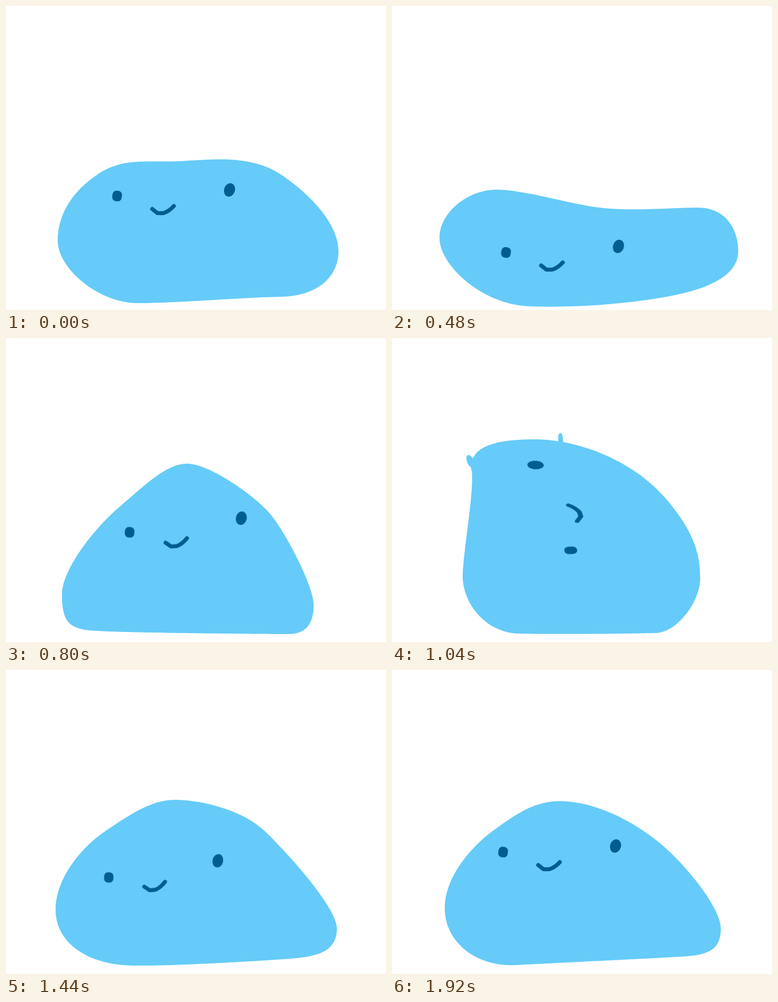
These frames come from a looping animation (720x576 px, 2240 ms). An HTML page without scripts:

```html
<!DOCTYPE html>
<html lang="en">
<head>
<meta charset="utf-8">
<title>Jelly blob</title>
<style>
  html, body { margin: 0; width: 100%; height: 100%; overflow: hidden; background: #fff; }
  svg { display: block; width: 100%; height: 100%; }
  .skin { fill: #66cbf8; }
  .face { fill: #005d90; }
  .mouth { fill: none; stroke: #005d90; stroke-width: 7.5; stroke-linecap: round; stroke-linejoin: round; }
  .body, .face, .ears { animation: 2240ms infinite; }
  .body { animation-name: wobble, stretch; transform-origin: 370px 570px; }
  .face { animation-name: ride; }
  .ears { animation-name: pop; animation-timing-function: step-end; }

  /* Poses sit on an 80 ms grid; each easing steps through it.
     An outline has seven smooth knots: left, shoulder, top, shoulder, right, two at the base. */
  @keyframes wobble {
    0%, 100% {
      d: path("M98 445 C98 393 127 350 175 318 S270 297 330 294 S465 280 525 322 S630 417 630 465 S590 550 520 551 S325 563 250 563 S98 497 98 445 Z");
      animation-timing-function: linear(0 0% 16.6%, .2 16.6% 33.3%, .4 33.3% 66.6%, .6 66.6% 83.3%, .8 83.3% 100%);
    }
    21.42% {
      d: path("M90 440 C90 390 145 349 195 348 S325 372 385 381 S530 382 580 382 S656 420 656 465 S600 537 520 551 S350 572 260 569 S90 490 90 440 Z");
      animation-timing-function: steps(4);
    }
    35.71% {
      d: path("M106 487 C106 437 170 358 215 320 S303 238 343 238 S463 293 495 327 S583 470 583 505 S570 561 535 561 S180 559 150 553 S106 537 106 487 Z");
      animation-timing-function: steps(3);
    }
    46.42% {
      d: path("M134 448 C136 397 156 290 151 250 S185 192 270 192 S457 234 515 300 S584 410 584 455 S540 558 500 559 S305 562 240 560 S132 499 134 448 Z");
      animation-timing-function: steps(3);
    }
    57.14% {
      d: path("M104 480 C104 425 220 352 280 322 S430 267 485 267 S560 293 566 325 S607 410 607 460 S560 535 500 550 S285 571 225 559 S104 535 104 480 Z");
      animation-timing-function: steps(2);
    }
    64.28% {
      d: path("M94 455 C94 393 145 334 190 304 S275 246 320 246 S446 263 490 305 S627 450 627 490 S595 542 550 546 S325 561 240 560 S94 517 94 455 Z");
      animation-timing-function: linear(0 0% 16.6%, .2 16.6% 33.3%, .4 33.3% 50%, .6 50% 66.6%, .8 66.6% 100%);
    }
    85.71% {
      d: path("M100 452 C100 392 150 334 195 302 S275 245 330 249 S446 280 500 322 S623 450 623 490 S600 540 550 543 S315 555 235 559 S100 512 100 452 Z");
      animation-timing-function: steps(1);
    }
  }

  /* Squash before the jump, stretch at its height. */
  @keyframes stretch {
    0%, 21.42%, 35.71%, 46.42%, 100% { transform: scale(1, 1); animation-timing-function: steps(2); }
    28.57% { transform: scale(1.24, .55); animation-timing-function: steps(2); }
    42.85% { transform: scale(.9, 1.43); animation-timing-function: steps(1); }
  }

  @keyframes ride {
    0%, 100% {
      transform: translate(317px, 354px) scale(1, 1) rotate(0deg);
      animation-timing-function: linear(0 0% 16.6%, .2 16.6% 33.3%, .4 33.3% 66.6%, .6 66.6% 83.3%, .8 83.3% 100%);
    }
    21.42% { transform: translate(322.5px, 461px) scale(1, 1) rotate(0deg); animation-timing-function: steps(2); }
    28.57% { transform: translate(330px, 505px) scale(1, 1) rotate(-1deg); animation-timing-function: steps(2); }
    35.71% { transform: translate(340px, 354.5px) scale(1, 1) rotate(-4.1deg); animation-timing-function: steps(2); }
    42.85% { transform: translate(300px, 235px) scale(1.05, .95) rotate(-55deg); animation-timing-function: steps(1); }
    46.42% { transform: translate(305px, 321.5px) scale(1.2, .785) rotate(-102deg); animation-timing-function: steps(3); }
    57.14% { transform: translate(417px, 361px) scale(.99, .99) rotate(8deg); animation-timing-function: steps(2); }
    64.28% {
      transform: translate(298px, 377px) scale(.98, .98) rotate(-5.6deg);
      animation-timing-function: linear(0 0% 16.6%, .2 16.6% 33.3%, .4 33.3% 50%, .6 50% 66.6%, .8 66.6% 100%);
    }
    85.71% { transform: translate(317px, 339px) scale(1, 1) rotate(0deg); animation-timing-function: steps(1); }
  }

  @keyframes pop {
    0%, 49.99%, 100% { visibility: hidden; }
    46.42% { visibility: visible; }
  }
</style>
</head>
<body>
<svg viewBox="0 0 720 576">
  <path class="skin body"/>
  <path class="skin ears" d="M150 250 V246 Q141 238 141 228 Q141 220 147 222 Q153 225 155 234 L165 225 V250 Z M315 200 V186 Q316 179 320 180 Q325 184 324 200 Z"/>
  <g class="face">
    <rect x="-115.5" y="-4" width="18" height="20" rx="7.5" transform="rotate(8 -106.5 6)"/>
    <ellipse cx="106.5" cy="-5.5" rx="10.3" ry="13" transform="rotate(18 106.5 -5.5)"/>
    <path class="mouth" d="M-40 30.5 L-30 38.5 H-19 Q-8 35 1 25"/>
  </g>
</svg>
</body>
</html>
```
